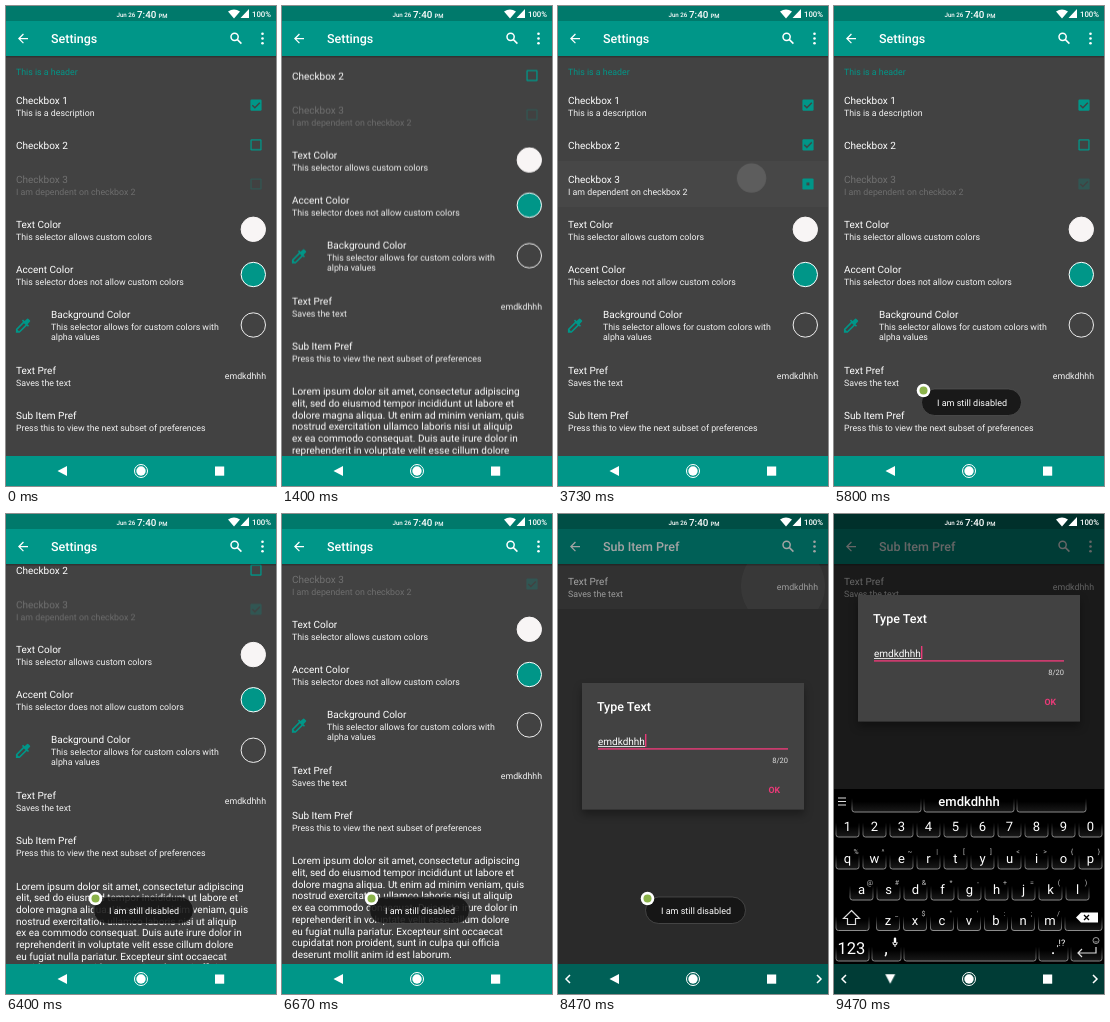
An HTML page for the animation above (9740 ms loop, 270 by 480 pixels).

```html
<!DOCTYPE html>
<html lang="en">
<head>
<meta charset="utf-8">
<title>Settings demo</title>
<style>
  html, body { margin: 0; height: 100%; overflow: hidden; background: #424242; }
  svg { display: block; width: 100vw; height: 100vh; font-family: Roboto, sans-serif; fill: #fff; }
  text { white-space: pre; text-rendering: geometricPrecision; }
  .title { font-size: 10px; }
  .note { font-size: 8.8px; fill: #f2f2f2; }
  .bar { font-size: 12.5px; font-weight: 500; }
  .teal { fill: #009688; }
  .pink { fill: #ea3a78; }
  .end { text-anchor: end; }
  .mid { text-anchor: middle; }
  .hole, .tick, .wave, #back { transform-box: fill-box; transform-origin: center; }
  .hole { fill: #424242; }
  .tick { fill: none; stroke: #424242; stroke-width: 1.4; }
  .key { fill: url(#keyFill); stroke: url(#keyEdge); }
  .icon { fill: none; stroke: #ddd; stroke-width: 1.2; }
</style>
</head>
<body>
<svg viewBox="0 0 270 480" preserveAspectRatio="none">
  <defs>
    <clipPath id="page"><rect y="50" width="270" height="400"/></clipPath>
    <clipPath id="row3"><rect y="155" width="270" height="46"/></clipPath>
    <clipPath id="subRow"><rect y="50" width="270" height="45"/></clipPath>
    <clipPath id="aboveNav"><rect width="270" height="450"/></clipPath>
    <linearGradient id="keyFill" x2="0" y2="1">
      <stop offset=".5"/><stop offset="1" stop-color="#1a1a1a"/>
    </linearGradient>
    <linearGradient id="keyEdge" x2="0" y2="1">
      <stop offset=".35" stop-color="#777" stop-opacity="0"/><stop offset="1" stop-color="#8c8c8c"/>
    </linearGradient>
    <linearGradient id="shade" x2="0" y2="1">
      <stop stop-opacity=".3"/><stop offset="1" stop-opacity="0"/>
    </linearGradient>
    <filter id="shadow" x="-20%" y="-20%" width="140%" height="150%">
      <feDropShadow dx="0" dy="5" stdDeviation="4" flood-opacity=".35"/>
    </filter>
  </defs>

  <rect width="270" height="480" fill="#424242"/>
  <g clip-path="url(#page)">
    <g id="list"></g>
    <ellipse id="glowTop" cx="135" cy="10" rx="190" ry="55" fill="#3f51b5"/>
    <ellipse id="glowBottom" cx="185" cy="500" rx="190" ry="66" fill="#3f51b5"/>
  </g>
  <rect class="teal" y="15" width="270" height="35"/>
  <text class="bar" x="45" y="37">Settings</text>

  <g id="sub">
    <rect y="50" width="270" height="400" fill="#424242"/>
    <rect class="teal" y="15" width="270" height="35"/>
    <text class="bar" x="45" y="37">Sub Item Pref</text>
    <g clip-path="url(#subRow)">
      <rect id="subPress" y="50" width="270" height="45"/>
      <circle id="subWave" class="wave" cx="225" cy="72" r="42"/>
    </g>
    <text class="title" x="10" y="71">Text Pref</text>
    <text class="note" x="10" y="83">Saves the text</text>
    <text class="note end" x="260" y="75.7">emdkdhhh</text>
  </g>

  <rect y="50" width="270" height="2.5" fill="url(#shade)"/>
  <path transform="translate(9.5 25) scale(.625)" d="M20 11H7.8l5.6-5.6L12 4l-8 8 8 8 1.4-1.4L7.8 13H20z"/>
  <g fill="none" stroke="#fff" stroke-width="1.5">
    <circle cx="228.6" cy="30.8" r="3.6"/><path d="M231.2 33.4l4.2 4.2"/>
  </g>
  <circle cx="256.5" cy="27.7" r="1.3"/><circle cx="256.5" cy="32.5" r="1.3"/><circle cx="256.5" cy="37.3" r="1.3"/>
  <rect width="270" height="15" fill="#00796b"/>
  <rect class="teal" y="450" width="270" height="30"/>

  <rect id="scrim" width="270" height="480" fill="#000"/>

  <g font-weight="500">
    <text x="110.5" y="11.2" font-size="6.2">Jun 26</text>
    <text x="131" y="11.5" font-size="9.8">7:40</text>
    <text x="152.5" y="11.5" font-size="6">PM</text>
    <text class="end" x="265" y="11" font-size="7.8">100%</text>
  </g>
  <path d="M222 5.5Q228 1.5 234 5.5L228 12.5zM243 3v9h-8.500z"/>

  <g id="dialog">
    <g id="dialogShift">
      <rect x="24" y="169" width="222" height="126.5" fill="#424242" filter="url(#shadow)"/>
      <text class="bar" x="39" y="197">Type Text</text>
      <text class="title" x="40" y="230.5">emdkdhhh</text>
      <rect x="40" y="232" width="47.5" height=".8"/>
      <rect class="pink" x="40" y="234.2" width="190" height="1.4"/>
      <rect id="caret" class="pink" x="87" y="220" width="1.4" height="13"/>
      <text class="end" x="230" y="248.5" font-size="7.5" fill="#ddd">8/20</text>
      <text class="mid pink" x="216.2" y="279.3" font-size="8.75" font-weight="700">OK</text>
    </g>
  </g>

  <g clip-path="url(#aboveNav)"><g id="keyboard"></g></g>

  <g id="toast">
    <rect x="87.5" y="383" width="100" height="26.5" rx="13.25" fill="#141414" fill-opacity=".88" stroke="#555" stroke-width=".7"/>
    <text x="103" y="399.8" font-size="9">I am still disabled</text>
    <circle cx="89.5" cy="384.5" r="6.8"/><circle cx="89.5" cy="384.5" r="4" fill="#8bb34a"/>
  </g>

  <path id="back" d="M51.5 465l9.500-5v10z"/>
  <circle cx="135" cy="465" r="4.7"/>
  <circle cx="135" cy="465" r="6.5" fill="none" stroke="#fff"/>
  <rect x="209" y="460.5" width="9.2" height="9.2"/>
  <path id="arrows" d="M12 461l-4 4 4 4M259 461l4 4-4 4" fill="none" stroke="#fff" stroke-width="1.5"/>
</svg>

<script>
const LOOP = 9740;
const $ = id => document.getElementById(id);
const text = (x, y, cls, s, more = '') => `<text x="${x}" y="${y}" class="${cls}" ${more}>${s}</text>`;

// Settings list
const pref = (y, title, note = [], x = 10) =>
  text(x, y, 'title', title) + note.map((s, i) => text(x, y + 12.2 + i * 9.8, 'note', s)).join('');
const checkbox = (id, y) => `<g id="${id}" transform="translate(250 ${y})">
  <rect class="teal" x="-5.6" y="-5.6" width="11.2" height="11.2" rx="1.2"/>
  <rect class="hole" x="-4.3" y="-4.3" width="8.6" height="8.6"/>
  <path class="tick" d="M-3.7 0l2.6 2.6 4.9-5"/></g>`;
const swatch = (y, fill, stroke = fill) =>
  `<circle cx="247.3" cy="${y}" r="12.2" fill="${fill}" stroke="${stroke}"/>`;
const lorem = `Lorem ipsum dolor sit amet, consectetur adipiscing
elit, sed do eiusmod tempor incididunt ut labore et
dolore magna aliqua. Ut enim ad minim veniam, quis
nostrud exercitation ullamco laboris nisi ut aliquip
ex ea commodo consequat. Duis aute irure dolor in
reprehenderit in voluptate velit esse cillum dolore
eu fugiat nulla pariatur. Excepteur sint occaecat
cupidatat non proident, sunt in culpa qui officia
deserunt mollit anim id est laborum.`.split('\n');

$('list').innerHTML = `
  <g clip-path="url(#row3)">
    <rect id="press3" y="155" width="270" height="46"/>
    <circle id="wave3" class="wave" cx="193.5" cy="172" r="14.5"/>
  </g>
  <rect id="pressSub" y="393" width="270" height="45"/>` +
  text(10, 69, 'note', 'This is a header', 'style="fill:#009688"') +
  pref(97.5, 'Checkbox 1', ['This is a description']) + checkbox('box1', 99.2) +
  pref(143, 'Checkbox 2') + checkbox('box2', 138.8) +
  `<g id="dependent">${pref(176.5, 'Checkbox 3', ['I am dependent on checkbox 2'])}${checkbox('box3', 178)}</g>` +
  pref(221.7, 'Text Color', ['This selector allows custom colors']) + swatch(223.3, '#f8f5f5') +
  pref(267, 'Accent Color', ['This selector does not allow custom colors']) + swatch(268.5, '#009688', '#fff') +
  pref(312, 'Background Color', ['This selector allows for custom colors with', 'alpha values'], 45) +
  swatch(319, '#424242', '#eee') +
  `<path class="teal" transform="translate(7.5 310) scale(.8)" fill-rule="evenodd" d="M20.7 5.6l-2.3-2.3q-.7-.6-1.4 0l-3.2 3.1-1.9-1.9-1.4 1.4 1.4 1.4L3 16.250V21h4.750l8.900-8.900 1.4 1.4 1.4-1.4-1.9-1.9 3.1-3.2q.6-.7 0-1.4zM6.900 19L5 17.100 13 9l2 2z"/>` +
  pref(367.5, 'Text Pref', ['Saves the text']) + text(260, 373, 'note end', 'emdkdhhh') +
  pref(412.7, 'Sub Item Pref', ['Press this to view the next subset of preferences']) +
  lorem.map((s, i) => text(10, 458.3 + i * 11.7, 'title', s)).join('');

// Keyboard
const key = (x, y, w, h = 22) => `<rect class="key" x="${x}" y="${y}" width="${w}" height="${h}" rx="2.5"/>`;
const keyRow = (chars, hints, x, y) => [...chars].map((c, i) => {
  const cx = x + i * 27;
  return key(cx - 11.5, y, 23) + text(cx, y + 16, 'mid', c, 'font-size="13"') +
    (hints ? text(cx + 8.5, y + 7, 'mid', hints[i].replace('&', '&amp;').replace('<', '&lt;'), 'font-size="7" fill="#bbb"') : '');
}).join('');

$('keyboard').innerHTML = `<rect y="275" width="270" height="175" fill="#000"/>
  <path class="icon" d="M4 284h8M4 287.5h8M4 291h8"/>` +
  key(18, 277, 69, 21) + key(90, 277, 90, 21) + key(183, 277, 69, 21) +
  text(135, 291.5, 'mid', 'emdkdhhh', 'font-size="13" font-weight="500"') +
  keyRow('1234567890', '', 13.5, 301) +
  keyRow('qwertyuiop', '%^~|[]<>{}', 13.5, 333) +
  keyRow('asdfghjkl', '@#&*-+=()', 27.5, 364) +
  keyRow('zxcvbnm', '_$"\':;/', 54, 394.5) +
  key(2, 394.5, 33) + key(231, 394.5, 37) +
  key(2, 425, 33) + key(38, 425, 29) + key(70, 425, 132) + key(205, 425, 29) + key(237, 425, 31) +
  text(17.5, 439.5, 'mid', '123', 'font-size="16.5"') + text(52, 440, 'mid', ',', 'font-size="18"') +
  text(219, 440, 'mid', '.', 'font-size="18"') + text(227, 432, 'mid', ',!?', 'font-size="9"') +
  `<path class="icon" d="M17.5 396.5l8 8h-4v6h-8v-6h-4zM262 433v6h-18m4-4l-4 4 4 4M59 428q0 3 2 3t2-3M61 431v2"/>
   <rect x="59.8" y="423.5" width="2.4" height="5.5" rx="1.2"/>
   <circle class="icon" cx="262" cy="426.5" r="3" style="stroke-width:.7"/>
   <path class="icon" d="M260.5 427.3q1.5 1.5 3 0" style="stroke-width:.6"/>
   <path d="M242 403.5l5-5h17v10h-17z"/><path d="M250 401l5 5m0-5l-5 5" stroke="#000" stroke-width="1.3"/>`;

// Each track lists [milliseconds, value] and becomes one CSS keyframe rule.
const sheet = document.head.appendChild(document.createElement('style'));
let rules = '#box1 .hole{transform:scale(0)}', count = 0;
function track(selector, property, points, easing = 'linear') {
  const name = 'track' + count++;
  const all = [[0, points[0][1]], ...points, [LOOP, points.at(-1)[1]]];
  const frames = all.map(([ms, v]) => `${(ms / LOOP * 100).toFixed(4)}%{${property}:${v}}`).join('');
  rules += `@keyframes ${name}{${frames}}${selector}{animation:${name} ${LOOP}ms ${easing} infinite}`;
}
const fade = (selector, ...points) => track(selector, 'opacity', points);
const scale = (selector, ...points) => track(selector, 'transform', points.map(([t, s]) => [t, `scale(${s})`]));
const slide = (selector, ...points) =>
  track(selector, 'transform', points.map(([t, y]) => [t, `translateY(${y}px)`]), 'cubic-bezier(.3,.3,.4,1)');

slide('#list', [1230, 0], [1650, -108], [1840, -108], [2180, 0], [6160, 0], [6640, -108]);
fade('#glowBottom', [1600, 0], [1780, .3], [2200, .15], [2600, 0]);
fade('#glowTop', [2200, 0], [2340, .2], [2600, .16], [3150, 0]);

scale('#box2 .hole', [3250, 1], [3400, 0], [4740, 0], [4870, 1]);
scale('#box2 .tick', [3400, 0], [3530, 1], [4650, 1], [4740, 0]);
scale('#box3 .hole', [3650, 1], [3770, 0]);
scale('#box3 .tick', [3770, 0], [3900, 1]);
fade('#dependent', [3269, .25], [3270, 1], [4599, 1], [4600, .25]);
fade('#press3', [3620, 0], [3700, .03], [3900, .03], [4150, 0]);
fade('#wave3', [3650, 0], [3670, .12], [3760, .12], [4100, 0]);
track('#wave3', 'scale', [[3650, .6], [3730, 1], [4100, 5]]);
fade('#pressSub', [7110, 0], [7150, .08], [7330, .08], [7400, 0]);

fade('#toast', [5050, 0], [5550, 1], [8520, 1], [8900, 0]);
fade('#sub', [7190, 0], [7320, 1]);
fade('#subPress', [8320, 0], [8380, .06], [8600, .06], [8850, 0]);
fade('#subWave', [8320, 0], [8350, .07], [8500, .07], [8800, 0]);
fade('#scrim', [8350, 0], [8470, .36], [8600, .6]);
fade('#dialog', [8350, 0], [8450, 1]);
slide('#dialogShift', [8950, 0], [9330, -88]);
slide('#keyboard', [8680, 176], [9000, 0]);
fade('#caret', [8969, 1], [8970, 0], [9469, 0], [9470, 1]);
fade('#arrows', [8399, 0], [8400, 1]);
track('#back', 'transform', [[8699, 'rotate(0deg)'], [8700, 'rotate(-90deg)']]);
// The press wave fades and grows at once, so its two tracks share one declaration.
const [fadeName, growName] = [...rules.matchAll(/#wave3\{animation:(\w+)/g)].map(m => m[1]);
rules += `#wave3{animation:${[fadeName, growName].map(n => `${n} ${LOOP}ms linear infinite`).join()}}`;
sheet.textContent = rules;
</script>
</body>
</html>
```
